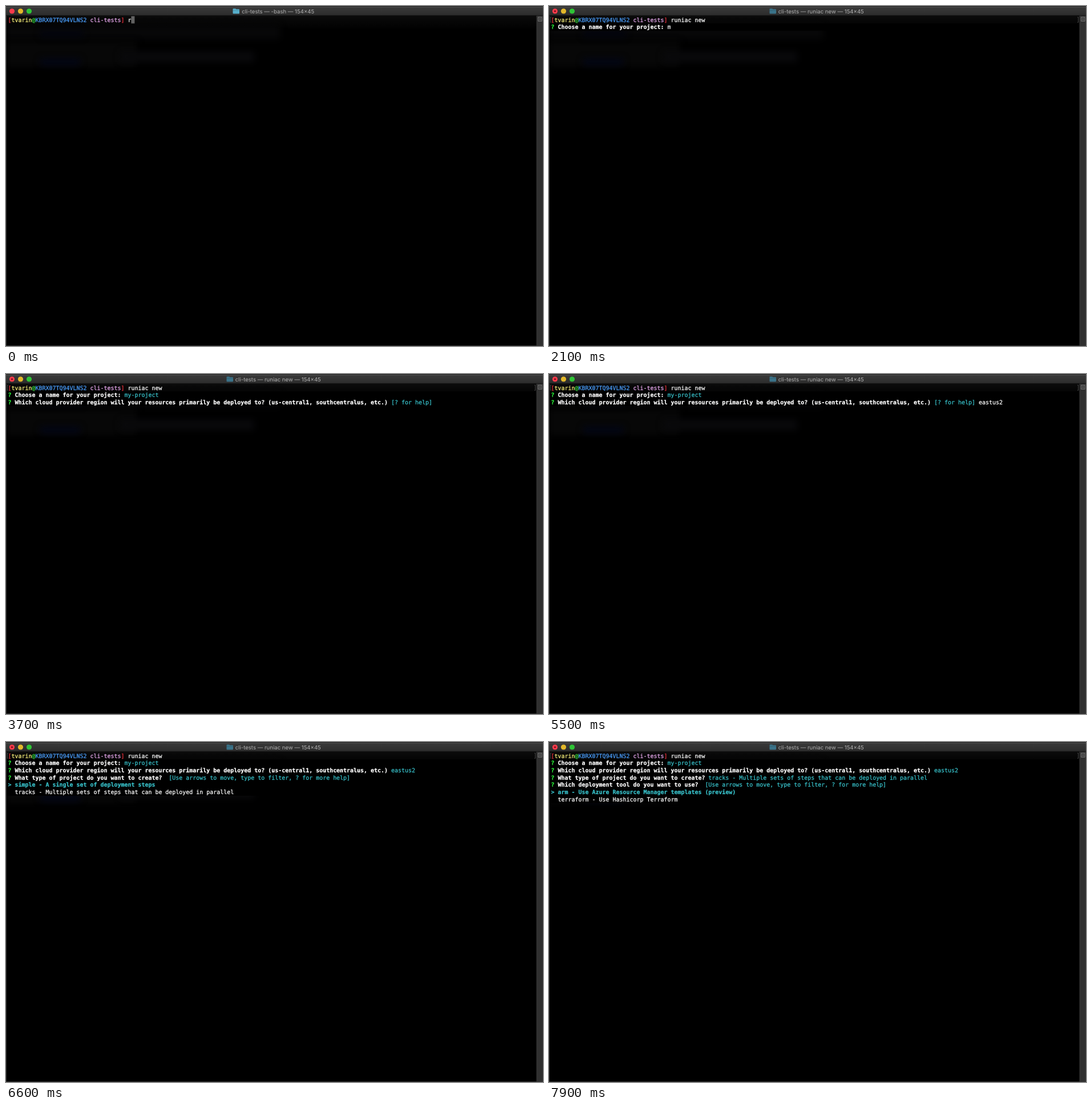
An HTML page with a canvas that plays this animation: 941x595 px, repeating every 8000 ms.

```html
<!DOCTYPE html>
<html lang="en">
<head>
<meta charset="utf-8">
<title>Terminal</title>
<style>
  html, body { margin: 0; width: 100%; height: 100%; overflow: hidden; background: #000; }
  canvas { display: block; }
</style>
</head>
<body>
<canvas id="stage" width="941" height="595"></canvas>
<script>
const ctx = document.getElementById('stage').getContext('2d');
const LOOP = 8000;
const CELL = 5.995, LINE = 12.7, LEFT = 3.6, TOP = 17.8, BASELINE = 9.8;
const MONO = '9.96px "DejaVu Sans Mono", monospace';
const WHITE = '#fff', CYAN = '#38c2cb', GREEN = '#2cf53a', RED = '#f0303a';

// Each entry: [time in ms, number of characters typed by then]
const COMMAND = { text: 'runiac new', keys: [[0, 1], [100, 2], [300, 4], [400, 5], [500, 7], [700, 8], [800, 9], [900, 10]] };
const NAME = { text: 'my-project', keys: [[2100, 1], [2200, 2], [2300, 3], [2500, 4], [2600, 5], [2800, 6], [2900, 7], [3000, 8], [3100, 9], [3200, 10]] };
const REGION = { text: 'eastus2', keys: [[4600, 1], [4700, 2], [4800, 3], [5000, 4], [5100, 5], [5200, 6], [5500, 7]] };
const AT = { enter: 1100, title: 1200, askName: 1300, askRegion: 3400, askType: 5800, arrowDown: 6700, askTool: 7200 };

const HELP = ' [Use arrows to move, type to filter, ? for more help]';
const TYPES = ['simple - A single set of deployment steps',
               'tracks - Multiple sets of steps that can be deployed in parallel'];
const TOOLS = ['arm - Use Azure Resource Manager templates (preview)',
               'terraform - Use Hashicorp Terraform'];

function typed({ text, keys }, t) {
  const count = keys.reduce((n, [time, length]) => t >= time ? length : n, 0);
  return text.slice(0, count);
}

function rect(x, y, w, h, color) {
  ctx.fillStyle = color;
  ctx.fillRect(x, y, w, h);
}

function disc(x, y, r, color) {
  ctx.fillStyle = color;
  ctx.beginPath();
  ctx.arc(x, y, r, 0, Math.PI * 2);
  ctx.fill();
}

// Writes [text, color, bold] parts on the character grid and returns the next column.
// A thin outline gives the glyphs their slightly heavy weight.
function write(row, ...parts) {
  const top = TOP + row * LINE;
  if (row) rect(1, top, 928, LINE, '#000');
  ctx.lineWidth = 0.25;
  let col = 0;
  for (const [text, color, bold] of parts) {
    ctx.font = (bold ? 'bold ' : '') + MONO;
    ctx.fillStyle = ctx.strokeStyle = color;
    for (const char of text) {
      const x = LEFT + col++ * CELL;
      ctx.fillText(char, x, top + BASELINE);
      ctx.strokeText(char, x, top + BASELINE);
    }
  }
  return col;
}

function ask(row, question, ...rest) {
  write(row, ['? ', GREEN, true], [question + ' ', WHITE, true], ...rest);
}

function menu(row, options, selected) {
  options.forEach((option, i) => {
    const active = i === selected;
    write(row + i, [(active ? '> ' : '  ') + option, active ? CYAN : WHITE, active]);
  });
}

function cursor(row, col) {
  rect(LEFT + col * CELL, TOP + row * LINE, CELL, LINE, '#626262');
}

function bracketMark(x, dir) {
  ctx.strokeStyle = '#4c4c4c';
  ctx.lineWidth = 0.9;
  ctx.beginPath();
  ctx.moveTo(x + 1.5 * dir, 19.5);
  ctx.lineTo(x, 19.5);
  ctx.lineTo(x, 28.5);
  ctx.lineTo(x + 1.5 * dir, 28.5);
  ctx.stroke();
}

// Faint blurred shapes showing through the translucent window
function backdrop() {
  rect(0, 0, 941, 595, '#000');
  const shade = ctx.createLinearGradient(0, 17, 0, 42);
  shade.addColorStop(0, '#0b0b0b');
  shade.addColorStop(1, '#000');
  rect(0, 17, 930, 25, shade);
  ctx.save();
  ctx.filter = 'blur(6px)';
  rect(0, 34, 480, 24, '#070708');
  rect(0, 62, 230, 44, '#070707');
  rect(200, 80, 235, 18, '#09090b');
  rect(60, 92, 70, 12, '#020515');
  rect(60, 44, 75, 10, '#02040f');
  ctx.restore();
}

function folder(x, color) {
  ctx.fillStyle = color;
  ctx.beginPath();
  ctx.roundRect(x, 4.5, 5.5, 4, 1);
  ctx.roundRect(x, 5.5, 11.5, 8, 1);
  ctx.fill();
  rect(x, 7, 11.5, 0.6, 'rgba(0,0,0,.25)');
}

function windowFrame(running) {
  const bar = ctx.createLinearGradient(0, 1, 0, 17);
  bar.addColorStop(0, '#3b3b3b');
  bar.addColorStop(1, '#2b2b2b');
  rect(0, 0, 941, 17, bar);
  rect(0, 0, 941, 1, '#161616');
  rect(0, 1, 941, 1, '#555');
  rect(0, 16, 941, 1, '#171717');

  disc(10.5, 9, 4.6, '#fb3b4b');
  disc(25.5, 9, 4.6, '#e3b82a');
  disc(40.5, 9, 4.6, '#2fc436');
  if (running) disc(10.5, 9, 1.5, '#6d0712');

  folder(running ? 386.5 : 397.5, running ? '#3b7389' : '#57aeca');
  ctx.font = '9.6px Inter, sans-serif';
  ctx.fillStyle = '#b2b2b2';
  ctx.textAlign = 'center';
  ctx.fillText(`cli-tests — ${running ? 'runiac new' : '-bash'} — 154×45`, 476.7, 12.6);
  ctx.textAlign = 'left';

  rect(930, 17, 11, 578, '#303030');
  rect(929.5, 17, 1, 578, '#383838');
  ctx.strokeStyle = '#8a8a8a';
  ctx.lineWidth = 0.8;
  ctx.strokeRect(932.5, 19.5, 6.5, 7);
  rect(934, 21.5, 3.5, 0.8, '#8a8a8a');
  rect(934, 23.7, 3.5, 0.8, '#8a8a8a');

  rect(0, 17, 1, 578, '#2e2e2e');
  rect(0, 594, 941, 1, '#333');
}

function session(t) {
  const col = write(0, ['[', RED], ['tvarin', '#fbf37c'], ['@', '#36d83e'],
    ['KBRX07TQ94VLNS2', '#4a9fff'], [' cli-tests', '#eaaaf0'], ['] ', RED],
    [typed(COMMAND, t), WHITE]);
  if (t < AT.enter) return cursor(0, col);

  bracketMark(2.5, 1);
  bracketMark(927.5, -1);
  if (t < AT.askName) return cursor(1, 0);

  ask(1, 'Choose a name for your project:',
    [typed(NAME, t), t < AT.askRegion ? WHITE : CYAN]);
  if (t < AT.askRegion) return;

  const regionAnswer = t < AT.askType
    ? [['[? for help] ', CYAN], [typed(REGION, t), WHITE]]
    : [[REGION.text, CYAN]];
  ask(2, 'Which cloud provider region will your resources primarily be deployed to? (us-central1, southcentralus, etc.)',
    ...regionAnswer);
  if (t < AT.askType) return;

  const choosing = t < AT.askTool;
  ask(3, 'What type of project do you want to create?', [choosing ? HELP : TYPES[1], CYAN]);
  if (choosing) return menu(4, TYPES, t < AT.arrowDown ? 0 : 1);

  ask(4, 'Which deployment tool do you want to use?', [HELP, CYAN]);
  menu(5, TOOLS, 0);
}

function draw(now) {
  const t = now % LOOP;
  ctx.textRendering = 'geometricPrecision';
  ctx.lineJoin = 'round';
  backdrop();
  windowFrame(t >= AT.title);
  session(t);
}

const start = performance.now();
function tick() {
  draw(performance.now() - start);
  requestAnimationFrame(tick);
}
tick();
</script>
</body>
</html>
```
